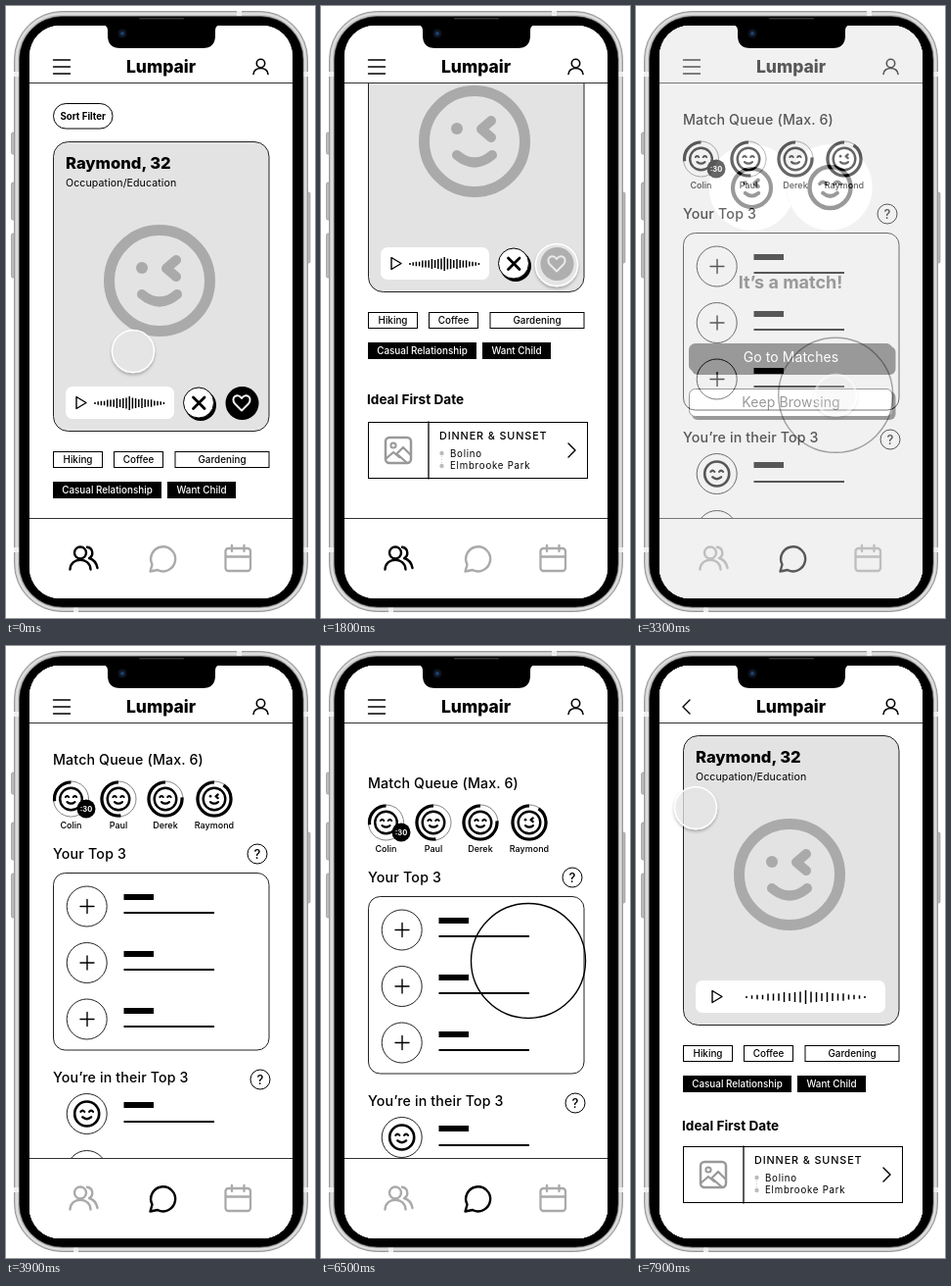
An HTML page that plays this animation: 316 by 624 pixels, repeating every 8000 ms.

```html
<!DOCTYPE html>
<html lang="en">
<head>
<meta charset="utf-8">
<title>Dating app prototype</title>
<style>
html, body { margin: 0; width: 100%; height: 100%; overflow: hidden; background: #fff; }
svg { display: block; width: 100%; height: 100%; }
text { font-family: Inter, "Open Sans", sans-serif; }
.line { fill: none; stroke-linecap: round; stroke-linejoin: round; }
</style>
</head>
<body>
<svg id="stage" viewBox="0 0 316 624"></svg>
<script>
const BLACK = '#000', GREY = '#aaa', LOOP = 8000;
const stage = document.getElementById('stage');

// Drawing helpers: each returns SVG markup.
const text = (x, y, size, weight, str, { fill = BLACK, anchor = 'start', gap = 0 } = {}) =>
  `<text x="${x}" y="${y}" font-size="${size}" font-weight="${weight}" fill="${fill}" text-anchor="${anchor}" letter-spacing="${gap}">${str}</text>`;
const rect = (x, y, w, h, r = 0, fill = 'none', stroke = 'none', sw = 1) =>
  `<rect x="${x}" y="${y}" width="${w}" height="${h}" rx="${r}" fill="${fill}" stroke="${stroke}" stroke-width="${sw}"/>`;
const circle = (x, y, r, fill = 'none', stroke = 'none', sw = 1) =>
  `<circle cx="${x}" cy="${y}" r="${r}" fill="${fill}" stroke="${stroke}" stroke-width="${sw}"/>`;
const line = (d, stroke = BLACK, sw = 1.4) =>
  `<path class="line" d="${d}" stroke="${stroke}" stroke-width="${sw}"/>`;
const group = (body, attrs = '') => `<g ${attrs}>${body}</g>`;

const face = (x, y, r, color, wink) => group(
  circle(0, 0, 51.5, 'none', color, 11) +
  line('M-18 14Q0 29 18 14', color, 10) +
  (wink
    ? circle(-18, -13, 6, color) + line('M17 -21L7 -12.500L17 -4', color, 10)
    : line('M-26 -9q8 -10 16 0M10 -9q8 -10 16 0', color, 9)),
  `transform="translate(${x} ${y}) scale(${r / 51.5})"`);

const wave = (x, y, step) => {
  const n = 23;
  let d = '';
  for (let i = 0; i < n; i++) {
    const swell = Math.sin(Math.PI * (i + .4) / n);
    const h = i === 11 ? 14 : 1.5 + 10 * swell * (.6 + .4 * Math.abs(Math.sin(i * 2)));
    d += `M${x + i * step} ${y - h / 2}v${h}`;
  }
  return `<path d="${d}" stroke="#000" stroke-width="1.500"/>`;
};

const header = back =>
  rect(24, 20, 269, 58, 0, '#fff') +
  line('M24 78.500H293', '#333', 1) +
  line(back ? 'M55 55L48 62L55 69' : 'M48.500 55H65.500M48.500 62H65.500M48.500 69H65.500') +
  text(158.5, 68, 17.5, 800, 'Lumpair', { anchor: 'middle' }) +
  circle(260.5, 58.500, 4.2, 'none', BLACK, 1.6) +
  line('M253 69.500C253 61.500 268 61.500 268 69.500', BLACK, 1.6);

const nav = active => {
  const tone = i => i === active ? BLACK : GREY;
  return rect(24, 522, 269, 82, 0, '#fff') + line('M24 522.500H293', '#333', 1) +
    circle(76, 557.500, 6, 'none', tone(0), 2.4) +
    line('M65.500 574.500C66 561.500 86 561.500 86.500 574.500M83 551.700A6 6 0 0 1 85 563Q92 565 93.500 573', tone(0), 2.4) +
    line('M149.500 569.500A12.500 12.500 0 1 1 155 575L147.500 576.500Z', tone(1), 2.4) +
    rect(224.5, 553, 25.5, 23, 3, 'none', tone(2), 2.3) +
    line('M225 561.500H250M231 550V556M243.500 550V556', tone(2), 2.3);
};

const tag = (x, y, w, str, dark) =>
  rect(x + .5, y + .5, w - 1, 16, 0, dark ? BLACK : '#fff', BLACK) +
  text(x + w / 2, y + 12, 9.9, 500, str, { anchor: 'middle', fill: dark ? '#fff' : BLACK });

const profileCard = (soundWidth, playX, waveX, step) =>
  rect(48.5, 138.5, 220.5, 295, 15, '#e3e3e3', '#222') +
  text(61, 166, 16.6, 800, 'Raymond, 32') +
  text(61, 184, 10.6, 400, 'Occupation/Education', { gap: .1 }) +
  face(157, 280, 51.5, GREY, true) +
  rect(61, 388, soundWidth, 33, 7, '#fff') +
  line(`M${playX} 398.500V410.500L${playX + 10} 404.500Z`) +
  wave(waveX, 405, step) +
  tag(48, 454, 51, 'Hiking') + tag(110, 454, 51, 'Coffee') + tag(172.5, 454, 97, 'Gardening') +
  tag(48, 485, 111, 'Casual Relationship', true) + tag(165, 485, 70, 'Want Child', true);

const firstDate = (titleY, y) =>
  text(47, titleY, 13.6, 700, 'Ideal First Date') +
  rect(48.5, y + .5, 224, 57, 0, '#fff', BLACK) + line(`M110 ${y}v58`, BLACK, 1.3) +
  group(
    rect(-13, -13, 26, 26, 4, 'none', '#999', 2.5) + circle(-5, -5, 2.6, 'none', '#999', 2) +
    line('M-12 8L-5 2L1 7M-2 4L5 -3L12 4M-1 4L8 12', '#999', 2.2),
    `transform="translate(79 ${y + 29})"`) +
  text(121, y + 18, 10.8, 500, 'DINNER &amp; SUNSET', { gap: .9 }) +
  `<path d="M123.500 ${y + 32}v13" stroke="#ccc" stroke-dasharray="1 2"/>` +
  circle(123.5, y + 32, 2.2, '#bbb') + circle(123.5, y + 45, 2.2, '#bbb') +
  text(132, y + 35.5, 9.7, 400, 'Bolino', { gap: .75 }) +
  text(132, y + 48, 9.7, 400, 'Elmbrooke Park', { gap: .75 }) +
  line(`M253 ${y + 22}l7 7l-7 7`);

const home =
  group(group(
    rect(48.5, 99.5, 60.5, 25.5, 12.7, '#fff', BLACK) +
    text(78.7, 116, 9.7, 700, 'Sort Filter', { anchor: 'middle' }) +
    profileCard(111, 72, 91, 3.2) +
    circle(199, 407, 16, BLACK) + circle(197, 404.500, 15.5, '#fff', BLACK) +
    line('M191.500 399L203 410.500M203 399L191.500 410.500', BLACK, 2.8) +
    circle(241.5, 405, 17, BLACK) +
    line('M241 412.500L234 405.500C229 399 237 394 241 400C245 394 253 399 248 405.500Z', '#fff', 1.9) +
    firstDate(548, 566), 'id="homeScroll"'), 'clip-path="url(#view)"') +
  header(false) + nav(0);

const button = (y, str, dark) =>
  rect(57, y + 3, 208.5, 29, 6, BLACK) +
  rect(54.5, y + .5, 207.5, 28, 6, dark ? BLACK : '#fff', BLACK) +
  text(158.5, y + 19, 14, 400, str, { anchor: 'middle', fill: dark ? '#fff' : BLACK, gap: .1 });

const match =
  rect(24, 20, 269, 584, 0, '#dcdcdc') +
  circle(118.5, 185, 44, '#fff') + circle(198, 185, 44, '#fff', '#e6e6e6', .8) +
  face(118.5, 185.5, 19.5, BLACK, true) + face(198.5, 185, 21, BLACK) +
  text(158, 288, 18, 700, 'It’s a match!', { anchor: 'middle' }) +
  button(344, 'Go to Matches', true) + button(390, 'Keep Browsing');

const help = (x, y) => circle(x, y, 10, '#fff', BLACK) + text(x, y + 4.7, 13, 500, '?', { anchor: 'middle' });

const suitor = (x, name, share, wink) => {
  const r = 17, len = 2 * Math.PI * r;
  return circle(x, 156, 18, '#fff', '#777', .9) +
    `<circle r="${r}" fill="none" stroke="#000" stroke-width="3.200" stroke-dasharray="${share * len} ${len}" transform="translate(${x} 156) scale(-1 1) rotate(-90)"/>` +
    face(x, 156, 11.3, BLACK, wink) +
    text(x, 186, 9, 500, name, { anchor: 'middle' });
};

const row = (y, bar, rule, inner) =>
  circle(82.7, y, 20.5, '#fff', '#222') + inner +
  rect(120.5, bar - 3, 30.5, 6, 0, BLACK) + rect(120.5, rule - 1, 92.5, 2, 0, BLACK);
const plus = y => line(`M76 ${y}h14M83 ${y - 7}v14`);

const matches =
  group(rect(24, 79, 269, 443, 0, '#fff') + group(
    text(48, 121, 14.2, 500, 'Match Queue (Max. 6)', { gap: .15 }) +
    suitor(66.5, 'Colin', .27) + suitor(115, 'Paul', .52) +
    suitor(163, 'Derek', .76) + suitor(213, 'Raymond', .9, true) +
    circle(82, 166, 9.5, BLACK) + text(82, 168.700, 7.5, 700, ':30', { anchor: 'middle', fill: '#fff' }) +
    text(48, 216.5, 14.2, 500, 'Your Top 3', { gap: .2 }) + help(257, 212) +
    rect(48.5, 231.5, 220.5, 180.5, 12, '#fff', '#222') +
    [0, 1, 2].map(i => row(265.5 + 57.5 * i, 256 + 58 * i, 272 + 58 * i, plus(265.5 + 57.5 * i))).join('') +
    text(48, 445, 14.2, 500, 'You’re in their Top 3', { gap: .15 }) + help(260, 442) +
    [0, 1, 2].map(i => row(477 + 58 * i, 468 + 59.500 * i, 485 + 59.500 * i,
      i === 1 ? '' : face(82.7, 477 + 58 * i, 12.5, BLACK))).join(''),
    'id="matchScroll"'), 'clip-path="url(#view)"') +
  header(false) + nav(1);

const profile =
  rect(24, 20, 269, 584, 0, '#fff') + header(true) +
  group(profileCard(194, 78, 113, 5.5), 'transform="translate(0 -47)"') +
  firstDate(494, 510);

const phone =
  rect(5.5, 129, 4, 22, 1.5, '#bbb', '#888', .6) + rect(5.5, 180, 4, 38, 1.5, '#bbb', '#888', .6) +
  rect(5.5, 232, 4, 45, 1.5, '#bbb', '#888', .6) + rect(307, 190, 4, 72, 1.5, '#bbb', '#888', .6) +
  rect(8.5, 5.5, 300, 612, 49, '#c6c6c6', '#999') + rect(11, 8, 295, 607, 46, 'none', '#e4e4e4', 1.5) +
  [[8, 67, 6, 5], [303, 67, 6, 5], [8, 552, 6, 5], [303, 552, 6, 5], [236, 5, 5, 6], [69, 612, 5, 6]]
    .map(b => rect(...b, 0, '#eee')).join('') +
  rect(13.5, 10.5, 290.5, 602.5, 44, BLACK, '#555', .7) + rect(136, 12, 46, 1.5, .7, '#333');

const notch =
  '<path d="M99 19H219Q214 20 214 25V30Q214 43 201 43H117Q104 43 104 30V25Q104 20 99 19Z"/>' +
  circle(119, 28, 4.5, '#0d1520') + circle(119, 28, 2, '#1d4068');

stage.innerHTML = `<defs>
    <clipPath id="screen">${rect(24, 20, 269, 584, 31, BLACK)}</clipPath>
    <clipPath id="view">${rect(24, 79, 269, 443, 0, BLACK)}</clipPath>
    <filter id="shadow" x="-30%" y="-30%" width="160%" height="160%">
      <feDropShadow dx="0" dy="2" stdDeviation="1.500" flood-opacity=".3"/>
    </filter>
  </defs>` + phone +
  group(rect(24, 20, 269, 584, 0, '#fff') + home +
    group(match, 'id="match"') + group(matches, 'id="matches"') + group(profile, 'id="profile"'),
    'clip-path="url(#screen)"') + notch +
  group(
    group(circle(0, 0, 21.5, 'rgba(238,238,238,.7)', '#fff', 1.5), 'id="touch" filter="url(#shadow)"') +
    group(circle(0, 0, 58.5, 'none', BLACK, 1.4) + circle(0, 0, 20.5, 'none', '#fff', 2.5), 'id="ring"'),
    'id="cursor"');

// Keyframes are [time, value, ...]; values between them are linear.
const at = (keys, t, k = 1) => {
  const i = keys.findIndex(key => key[0] > t);
  if (i < 0) return keys[keys.length - 1][k];
  if (i === 0) return keys[0][k];
  const a = keys[i - 1], b = keys[i];
  return a[k] + (b[k] - a[k]) * (t - a[0]) / (b[0] - a[0]);
};

const path = [
  [0, 130, 352], [100, 135, 234], [200, 150, 130], [300, 170, 90], [450, 195, 135], [800, 248, 356],
  [900, 247, 352], [1100, 228, 300], [1300, 212, 268], [1500, 222, 243], [1800, 241, 264],
  [2100, 241, 275], [2400, 281, 347], [2550, 289, 378], [2700, 265, 384], [3000, 182, 362],
  [3500, 219, 420], [3600, 219, 420], [3800, 240, 438], [4200, 213, 378], [4600, 96, 345], [5000, 180, 303],
  [5400, 194, 142], [5600, 197, 142], [5800, 200, 171], [6500, 212, 321], [6650, 222, 315],
  [7000, 213, 160], [7200, 213, 156], [7600, 61, 153], [7700, 61, 156], [7900, 61, 165]
];
const homeOffset = [[0, 0], [100, 118], [200, 136], [300, 142]];
const matchOffset = [[5000, 0], [5400, 108], [5600, 108], [5800, 80], [6150, 0], [6500, -24], [6700, 0]];
const fades = {
  match: [[1800, 0], [2000, 1]],
  matches: [[3000, 0], [3500, 1]],
  profile: [[7100, 0], [7400, 1]],
  touch: [[3100, 1], [3400, 0], [7500, 0], [7700, 1]],
  ring: [[3200, 0], [3500, 1], [3700, 1], [3900, 0], [4100, 0], [4200, 1], [7500, 1], [7700, 0]]
};
const el = id => document.getElementById(id);
const move = (id, x, y) => el(id).setAttribute('transform', `translate(${x} ${y})`);

function draw(now) {
  const t = Math.floor(now % LOOP / 100) * 100; // ten steps a second
  move('homeScroll', 0, -at(homeOffset, t));
  move('matchScroll', 0, -at(matchOffset, t));
  move('cursor', at(path, t, 1), at(path, t, 2));
  for (const id in fades) el(id).setAttribute('opacity', at(fades[id], t));
}

let start;
function tick(now) {
  start ??= now;
  draw(now - start);
  requestAnimationFrame(tick);
}
draw(0);
requestAnimationFrame(tick);
</script>
</body>
</html>
```
